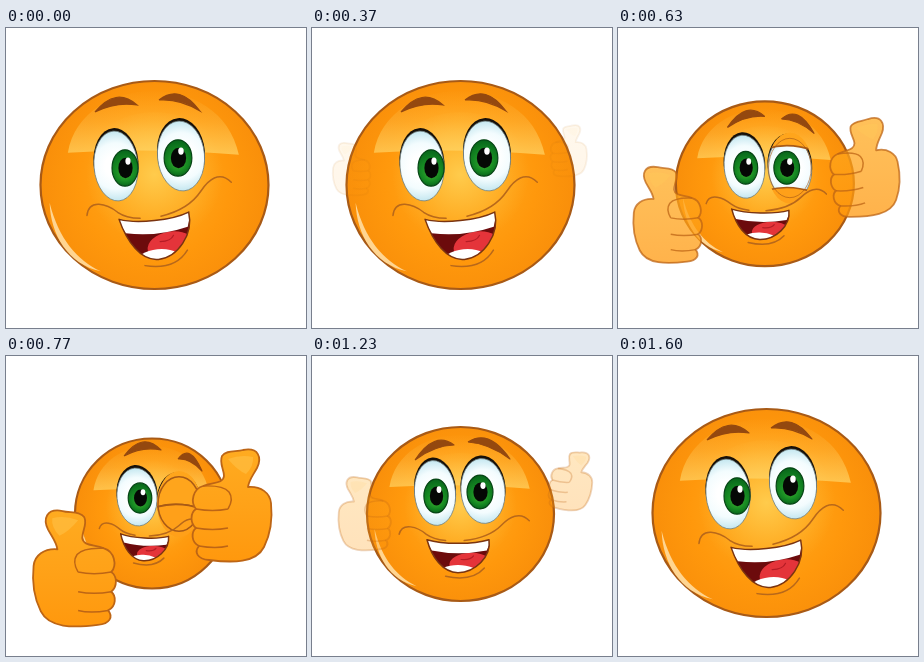
Recreate the animation shown at these times as an HTML page with a canvas. Size 300 px wide and 300 px high, loop 2000 ms.

```html
<!DOCTYPE html>
<html lang="en">
<head>
<meta charset="utf-8">
<title>Thumbs up</title>
<style>
  html, body { margin: 0; height: 100%; overflow: hidden; background: #fff; }
  canvas { display: block; width: 100vw; height: 100vh; }
</style>
</head>
<body>
<canvas id="stage" width="300" height="300"></canvas>
<script>
const ctx = document.getElementById('stage').getContext('2d');
const LOOP = 2000;
const LINE = '#a85a16';

// Pose: face x, y, rx, ry | eye centres | eye rx, ry | iris centres |
// mouth x, y, half width, half height, tilt | brow ends | wink
const REST = [148.5, 157, 114, 104, 110, 138, 175, 128, 23, 35, 119, 140, 172, 130,
  150, 208, 35, 24, -6, 89, 84, 131, 77, 153, 72, 194, 83, 0];
const SHRINK = [147.5, 154.5, 98, 88, 123, 137, 171, 134, 21.5, 33.5, 123, 138, 167, 136,
  145, 199, 32, 18, 0, 103, 99, 140, 84, 157, 82, 196, 98, 0];
const WINK = [146, 157.5, 77, 75, 131, 141, 173, 148, 21, 29, 134, 142, 171, 145,
  138, 191, 24, 14, 3, 118, 100, 155, 94, 172, 103, 196, 115, 1];
const OPEN = [144, 155.5, 81, 76, 128, 138, 171, 141, 20.5, 28.5, 131, 140, 172, 141,
  142, 193, 29, 16, 6, 115, 99, 152, 93, 168, 94, 196, 112, 0];
const GROW = [148.5, 158, 93.5, 87, 123, 137, 171, 135, 21.5, 32.5, 124, 140, 168, 136,
  146, 199, 31, 18, 0, 103, 104, 142, 89, 156, 86, 198, 103, 0];

// Key times are in steps of 1/30 s.
const FACE = [[0, REST], [11, REST], [16, SHRINK], [23, WINK], [28, WINK],
  [32, OPEN], [37, GROW], [48, REST], [60, REST]];

// Hands: left x, y, height | right x, y, height, tilt | alpha
const FRONT = [69, 213, 117, 225, 150, 113, 0, 1];
const HANDS = [
  [10, [45, 138, 48, 250, 122, 45, 0, 0]],
  [13.5, [27, 150, 66, 272, 126, 68, -8, 0.3]],
  [16, [36, 168, 82, 261, 133, 86, -12, 0.55]],
  [23, FRONT],
  [28, FRONT],
  [32, [48, 204, 105, 236, 145, 101, 0, 0.92]],
  [34.5, [36, 186, 92, 256, 135, 80, 3, 0.6]],
  [37, [53, 158, 74, 259, 125, 60, 8, 0.28]],
  [41, [75, 140, 55, 250, 118, 45, 8, 0]]
];

function sample(keys, step) {
  if (step <= keys[0][0]) return keys[0][1];
  for (let i = 1; i < keys.length; i++) {
    const [start, from] = keys[i - 1], [end, to] = keys[i];
    if (step <= end) {
      const u = (step - start) / (end - start);
      return from.map((v, j) => v + (to[j] - v) * u);
    }
  }
  return keys[keys.length - 1][1];
}

// Builds a path in local units, so that stroke widths stay in pixels.
function shape(x, y, sx, sy, degrees, build) {
  ctx.save();
  ctx.translate(x, y);
  ctx.rotate(degrees * Math.PI / 180);
  ctx.scale(sx, sy);
  ctx.beginPath();
  build();
  ctx.restore();
}

function paint(fill, stroke, width) {
  if (fill) { ctx.fillStyle = fill; ctx.fill(); }
  if (stroke) { ctx.strokeStyle = stroke; ctx.lineWidth = width; ctx.stroke(); }
}

function oval(x, y, rx, ry, fill, stroke, width, degrees = 0) {
  ctx.beginPath();
  ctx.ellipse(x, y, rx, ry, degrees * Math.PI / 180, 0, 7);
  paint(fill, stroke, width);
}

function gradient(g, ...stops) {
  stops.forEach((c, i) => g.addColorStop(i / (stops.length - 1), c));
  return g;
}

function drawHead(x, y, rx, ry) {
  oval(x, y, rx, ry, gradient(
    ctx.createRadialGradient(x, y - ry * 0.1, 0, x, y, rx),
    '#ffab22', '#ffa317', '#ff980c', '#f98f0a'), LINE, 2.2);
  const glow = gradient(ctx.createRadialGradient(x, y - ry * 0.1, 0, x, y - ry * 0.1, rx * 0.6),
    'rgba(255,214,90,.75)', 'rgba(255,200,70,0)');
  oval(x, y, rx * 0.7, ry * 0.7, glow);
  shape(x, y, rx, ry, 0, () => {
    ctx.moveTo(-0.76, -0.31);
    ctx.bezierCurveTo(-0.64, -1.08, 0.58, -1.13, 0.74, -0.29);
    ctx.quadraticCurveTo(0, -0.36, -0.76, -0.31);
  });
  paint(gradient(ctx.createLinearGradient(0, y - ry * 0.92, 0, y - ry * 0.3),
    'rgba(255,214,110,0)', 'rgba(255,216,110,.25)', 'rgba(255,218,110,.65)'));
  shape(x, y, rx, ry, 0, () => {
    ctx.moveTo(-0.92, 0.17);
    ctx.bezierCurveTo(-0.84, 0.52, -0.68, 0.72, -0.47, 0.83);
    ctx.bezierCurveTo(-0.76, 0.76, -0.91, 0.48, -0.92, 0.17);
  });
  paint('#ffd591');
}

function drawEye(x, y, rx, ry, ix, iy, tilt) {
  oval(x, y - 3, rx + 0.5, ry, '#171009', null, 0, tilt);
  oval(x, y, rx, ry, gradient(ctx.createRadialGradient(x, y, rx * 0.5, x, y, ry),
    '#ffffff', '#f3fcfe', '#c4e7f0'), '#6f7f80', 0.8, tilt);
  const irisX = rx * 0.59, irisY = ry * 0.52;
  oval(ix, iy, irisX, irisY, gradient(
    ctx.createRadialGradient(ix, iy + irisY * 0.4, 1, ix, iy, irisY),
    '#35a52c', '#178b23', '#07651a'), '#064515', 1.2);
  oval(ix + 0.5, iy, irisX * 0.55, irisY * 0.56, '#050805');
  oval(ix + 3, iy - irisY * 0.38, irisX * 0.2, irisY * 0.2, '#fff');
}

function drawWink(x, y, rx, ry, amount) {
  if (amount <= 0) return;
  ctx.save();
  ctx.beginPath();
  ctx.ellipse(x, y, rx + 1, ry + 4, 0, 0, 7);
  ctx.clip();
  // Upper and lower lids meet just below the middle.
  const seam = y + ry * 0.12;
  const top = y - ry - 5, bottom = y + ry + 5;
  const upper = top + (seam - top) * amount;
  const lower = bottom + (seam - bottom) * amount;
  ctx.beginPath();
  ctx.moveTo(x - rx - 3, top);
  ctx.lineTo(x - rx - 3, upper);
  ctx.quadraticCurveTo(x, upper - 7, x + rx + 3, upper + 2);
  ctx.lineTo(x + rx + 3, top);
  paint('#ffa51c', LINE, 1.6);
  ctx.beginPath();
  ctx.moveTo(x - rx - 3, bottom);
  ctx.lineTo(x - rx - 3, lower);
  ctx.quadraticCurveTo(x, lower - 7, x + rx + 3, lower + 2);
  ctx.lineTo(x + rx + 3, bottom);
  paint('#ffa019', LINE, 1.6);
  ctx.restore();
  oval(x, y, rx, ry * 0.94, null, LINE, 1.5 * amount);
}

function drawBrow(x1, y1, x2, y2) {
  const mx = (x1 + x2) / 2, my = (y1 + y2) / 2;
  ctx.beginPath();
  ctx.moveTo(x1, y1);
  ctx.quadraticCurveTo(mx, my - 22, x2, y2);
  ctx.quadraticCurveTo(mx, my - 7, x1, y1);
  paint('#94480f', '#94480f', 1.2);
}

function mouthOutline() {
  ctx.moveTo(-1, -0.85);
  ctx.bezierCurveTo(-0.5, -0.58, 0.5, -0.58, 1, -0.85);
  ctx.bezierCurveTo(1.08, 0.1, 0.55, 0.98, 0, 0.98);
  ctx.bezierCurveTo(-0.5, 0.98, -0.85, 0.1, -1, -0.85);
}

function drawMouth(x, y, w, h, tilt) {
  const local = build => shape(x, y, w, h, tilt, build);
  ctx.lineCap = 'round';
  local(() => {
    ctx.moveTo(-1.9, -1.15);
    ctx.bezierCurveTo(-1.8, -1.85, -1.3, -1.55, -1.02, -1.15);
    ctx.quadraticCurveTo(-0.8, -0.88, -0.4, -0.8);
    ctx.moveTo(2.3, -1.9);
    ctx.bezierCurveTo(2, -2.45, 1.65, -2.1, 1.4, -1.65);
    ctx.quadraticCurveTo(1, -0.95, 0.2, -0.8);
    ctx.moveTo(-0.4, 1.18);
    ctx.quadraticCurveTo(0.45, 1.5, 0.85, 0.72);
  });
  paint(null, '#b8681a', 1.5);

  ctx.save();
  local(mouthOutline);
  paint('#6c0b0c');
  ctx.clip();
  local(() => ctx.ellipse(0.4, 0.5, 0.68, 0.62, -0.25, 0, 7));
  paint('#e4343a');
  local(() => {
    ctx.moveTo(0.1, 0.25);
    ctx.quadraticCurveTo(0.4, 0.3, 0.5, 0.05);
  });
  paint(null, '#b51c25', 1.2);
  local(() => ctx.ellipse(0, 1.05, 0.65, 0.5, 0, 0, 7));
  paint('#fff');
  local(() => {
    ctx.moveTo(-1.1, -1);
    ctx.lineTo(1.1, -1);
    ctx.lineTo(0.93, -0.25);
    ctx.quadraticCurveTo(0, 0.05, -0.85, -0.25);
  });
  paint('#fff');
  ctx.restore();
  local(mouthOutline);
  paint(null, '#7a3410', 1.5);
}

function drawFace(pose, swell) {
  const [x, y, rx, ry, ex1, ey1, ex2, ey2, erx, ery, ix1, iy1, ix2, iy2,
    mx, my, mw, mh, tilt, ...rest] = pose;
  const wink = rest.pop();
  ctx.save();
  ctx.translate(x, y);
  ctx.scale(swell, swell);
  ctx.translate(-x, -y);
  drawHead(x, y, rx, ry);
  drawEye(ex1, ey1, erx - 1, ery, ix1, iy1, -5);
  drawEye(ex2, ey2, erx + 0.5, ery, ix2, iy2, -5);
  drawWink(ex2, ey2, erx, ery, wink);
  drawBrow(...rest.slice(0, 4));
  drawBrow(...rest.slice(4));
  drawMouth(mx, my, mw, mh, tilt);
  ctx.restore();
}

function handOutline() {
  ctx.moveTo(-28, -20);
  ctx.bezierCurveTo(-18, -24, -8, -22, -7, -30);
  ctx.bezierCurveTo(-7, -37, -12, -43, -9, -50);
  ctx.bezierCurveTo(-5, -56, 5, -54, 12, -56);
  ctx.bezierCurveTo(28, -59, 31, -48, 26, -38);
  ctx.bezierCurveTo(21, -29, 18, -26, 17, -19);
  ctx.bezierCurveTo(30, -20, 39, -13, 40, -3);
  ctx.bezierCurveTo(42, 16, 38, 31, 33, 41);
  ctx.bezierCurveTo(25, 57, 2, 57, -22, 54);
  ctx.bezierCurveTo(-34, 53, -37, 46, -32, 40);
  ctx.bezierCurveTo(-40, 36, -40, 26, -35, 22);
  ctx.bezierCurveTo(-41, 17, -41, 7, -35, 3);
  ctx.bezierCurveTo(-41, -4, -38, -17, -28, -20);
}

function fingerLines() {
  for (const [x, y] of [[-35, 3], [-35, 22], [-32, 40]]) {
    ctx.moveTo(x, y);
    ctx.quadraticCurveTo(x + 17, y + 3, -3, y);
  }
  ctx.moveTo(-28, -20);
  ctx.quadraticCurveTo(-8, -21, -2, -14);
  ctx.quadraticCurveTo(3, -7, -3, 3);
}

function drawHand(x, y, height, side, tilt, alpha) {
  const size = height / 113;
  const local = build => shape(x, y, size * side, size, tilt, build);
  ctx.globalAlpha = alpha;
  ctx.lineJoin = 'round';
  local(handOutline);
  paint(gradient(ctx.createLinearGradient(x, y - height / 2, x, y + height / 2),
    '#ffab20', '#ffa218', '#ff980d'), '#bd6515', 1.8);
  local(fingerLines);
  paint(null, '#bd6515', 1.5);
  local(() => {
    ctx.moveTo(-3, -47);
    ctx.quadraticCurveTo(10, -52, 22, -49);
    ctx.quadraticCurveTo(23, -40, 15, -32);
    ctx.quadraticCurveTo(6, -36, -3, -47);
  });
  paint('rgba(255,205,90,.4)');
  ctx.globalAlpha = 1;
}

function draw(now) {
  const step = Math.floor(((now % LOOP) + 4) * 0.03);
  const swell = step < 11 ? 1 + 0.1 * Math.sin(Math.PI * step / 11) : 1;
  ctx.fillStyle = '#fff';
  ctx.fillRect(0, 0, 300, 300);
  drawFace(sample(FACE, step), swell);
  const [lx, ly, lh, rx, ry, rh, tilt, alpha] = sample(HANDS, step);
  if (alpha > 0) {
    drawHand(lx, ly, lh, -1, 0, alpha);
    drawHand(rx, ry, rh, 1, tilt, alpha);
  }
}

const began = performance.now();
function tick() {
  draw(performance.now() - began);
  requestAnimationFrame(tick);
}
tick();
</script>
</body>
</html>
```
